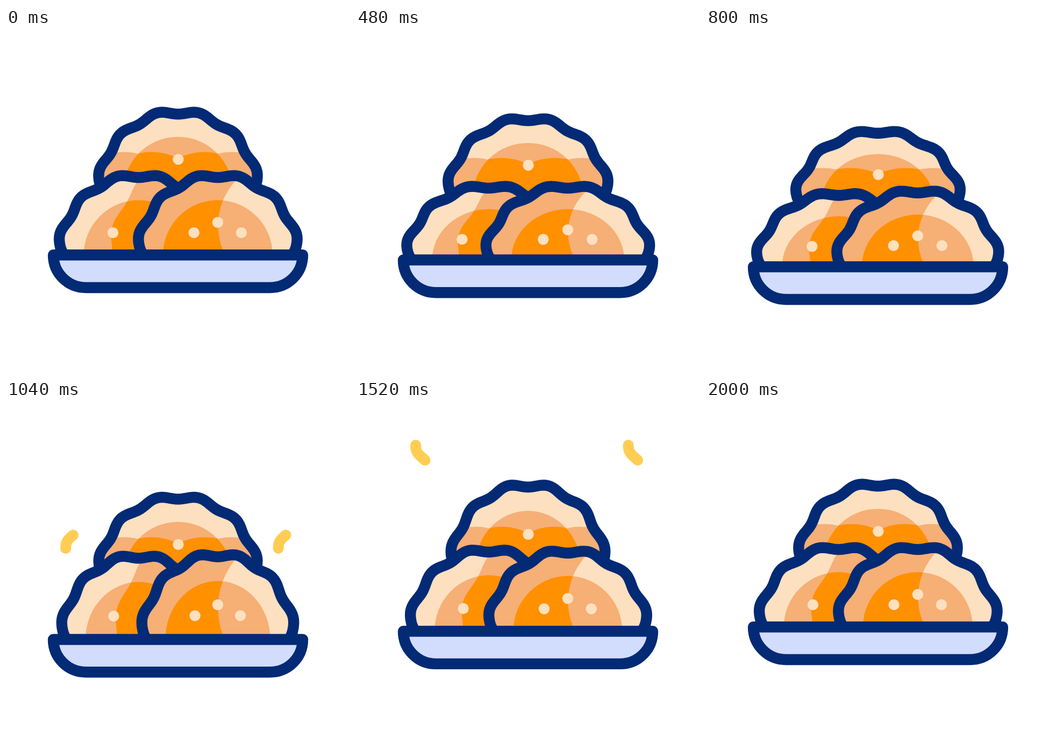
These frames come from a looping animation (640x640 px, 2.04 s). An HTML page with a canvas:

```html
<!DOCTYPE html>
<html lang="en">
<head>
<meta charset="utf-8">
<title>Dumplings</title>
<style>
html, body { margin: 0; width: 100%; height: 100%; overflow: hidden; background: #fff; }
canvas { display: block; width: 100vw; height: 100vh; object-fit: contain; }
</style>
</head>
<body>
<canvas id="stage" width="640" height="640"></canvas>
<script>
const ctx = document.getElementById('stage').getContext('2d');
const LOOP = 2040, STEP = 40, LINE = 20.4;
const NAVY = '#032a75', PALE = '#fde0bf', PEACH = '#f6af75',
      ORANGE = '#ff9000', PLATE = '#d2dcfd', STEAM = '#ffcd52';

const ease = (t, a, b) => {
  const u = Math.min(1, Math.max(0, (t - a) / (b - a)));
  return (1 - Math.cos(Math.PI * u)) / 2;
};

// Eased values between [time, value] keys
function track(t, keys) {
  let v = keys[0][1];
  for (let i = 1; i < keys.length; i++) {
    v += (keys[i][1] - keys[i - 1][1]) * ease(t, keys[i - 1][0], keys[i][0]);
  }
  return v;
}

// Half round with six crimps, one every 30 degrees
function crimped(radius, from) {
  const p = new Path2D();
  for (let deg = 180 - from; deg >= from; deg--) {
    const a = deg * Math.PI / 180, r = radius - 3.7 * Math.cos(12 * a);
    p.lineTo(r * Math.cos(a), -r * Math.sin(a));
  }
  return p;
}

function circle(x, y, r) {
  const p = new Path2D();
  p.arc(x, y, r, 0, 7);
  return p;
}

const edge = crimped(147.9, 8);
edge.quadraticCurveTo(145, -8, 137, 2);
edge.lineTo(-137, 2);
edge.quadraticCurveTo(-145, -8, -146.8, -20.6);
edge.closePath();

const filling = circle(0, 0, 102);
const leftShade = crimped(199.5, 0);
const rightShade = circle(122.5, -55, 122);
rightShade.rect(-400, -400, 800, 800);
const topShade = new Path2D('M-155 20V-64Q-130-73.6-99-73.6Q-86-73.6-75-70.5Q-64-73.6-49-73.6' +
  'Q-22-73.6 0-61.5Q22-73.6 49-73.6Q64-73.6 75-70.5Q86-73.6 99-73.6Q130-73.6 155-64V20Z');
const plate = new Path2D('M88 422.3H552C552 456 525 483 491 483H149C115 483 88 456 88 422.3Z');

function pose(x, y, sy) {
  const sx = 1 - (sy - 1) * (sy < 1 ? 0.42 : 0.65);
  return new DOMMatrix([sx, 0, 0, sy, x, y]);
}

function placed(path, m) {
  const p = new Path2D();
  p.addPath(path, m);
  return p;
}

function outline(path) {
  ctx.strokeStyle = NAVY;
  ctx.lineWidth = LINE;
  ctx.stroke(path);
}

function dumpling(m, shade, shadeM, dots) {
  const body = placed(edge, m), core = placed(filling, m), dark = placed(shade, shadeM);
  ctx.save();
  ctx.clip(body);
  ctx.fillStyle = PALE;
  ctx.fill(body);
  ctx.fillStyle = PEACH;
  ctx.fill(core);
  ctx.fill(dark, 'evenodd');
  ctx.clip(dark, 'evenodd');
  ctx.fillStyle = ORANGE;
  ctx.fill(core);
  ctx.restore();
  ctx.fillStyle = PALE;
  for (const [x, y] of dots) {
    const q = m.transformPoint(new DOMPoint(x, y));
    ctx.fill(circle(q.x, q.y, 10.2));
  }
  outline(body);
}

function steam(x, t) {
  const from = 276 - 192 * ease(t, 1160, 1640);
  const to = 276 - 192 * ease(t, 930, 1400);
  if (from - to < 0.5) return;
  ctx.beginPath();
  for (let i = 0; i <= 80; i++) {
    const y = from + (to - from) * i / 80, u = (y - 180) * Math.PI / 48;
    ctx.lineTo(x - 14 * (Math.cos(u) - 0.08 * Math.cos(3 * u)), y);
  }
  ctx.strokeStyle = STEAM;
  ctx.lineWidth = 20;
  ctx.stroke();
}

function draw(t) {
  ctx.fillStyle = '#fff';
  ctx.fillRect(0, 0, 640, 640);
  ctx.lineJoin = ctx.lineCap = 'round';

  const drop = 23.2 * (ease(t, 150, 910) - ease(t, 1086, 1806));
  const base = 422.3 + drop;
  const top = pose(320, 304.4 + drop * 1.06,
    track(t, [[340, 1], [815, 0.915], [1265, 1.09], [1780, 1]]));
  const left = pose(246.7, base,
    track(t, [[40, 1], [700, 0.902], [1160, 1.076], [1720, 1]]));
  const right = pose(394, base,
    track(t, [[40, 1], [650, 0.91], [1080, 1.07], [1650, 1]]));

  steam(124, t);
  steam(519.6, t);
  dumpling(top, topShade, top, [[0.5, -60]]);
  dumpling(left, leftShade, right, [[-47.8, -41.4]]);
  dumpling(right, rightShade, right, [[-44.3, -41.4], [0, -60.5], [44, -41.4]]);

  const dish = placed(plate, new DOMMatrix([1, 0, 0, 1, 0, drop]));
  ctx.fillStyle = PLATE;
  ctx.fill(dish);
  outline(dish);
}

const start = performance.now();
function tick() {
  const t = (performance.now() - start) % LOOP;
  draw(Math.floor(t / STEP) * STEP);
  requestAnimationFrame(tick);
}
tick();
</script>
</body>
</html>
```
